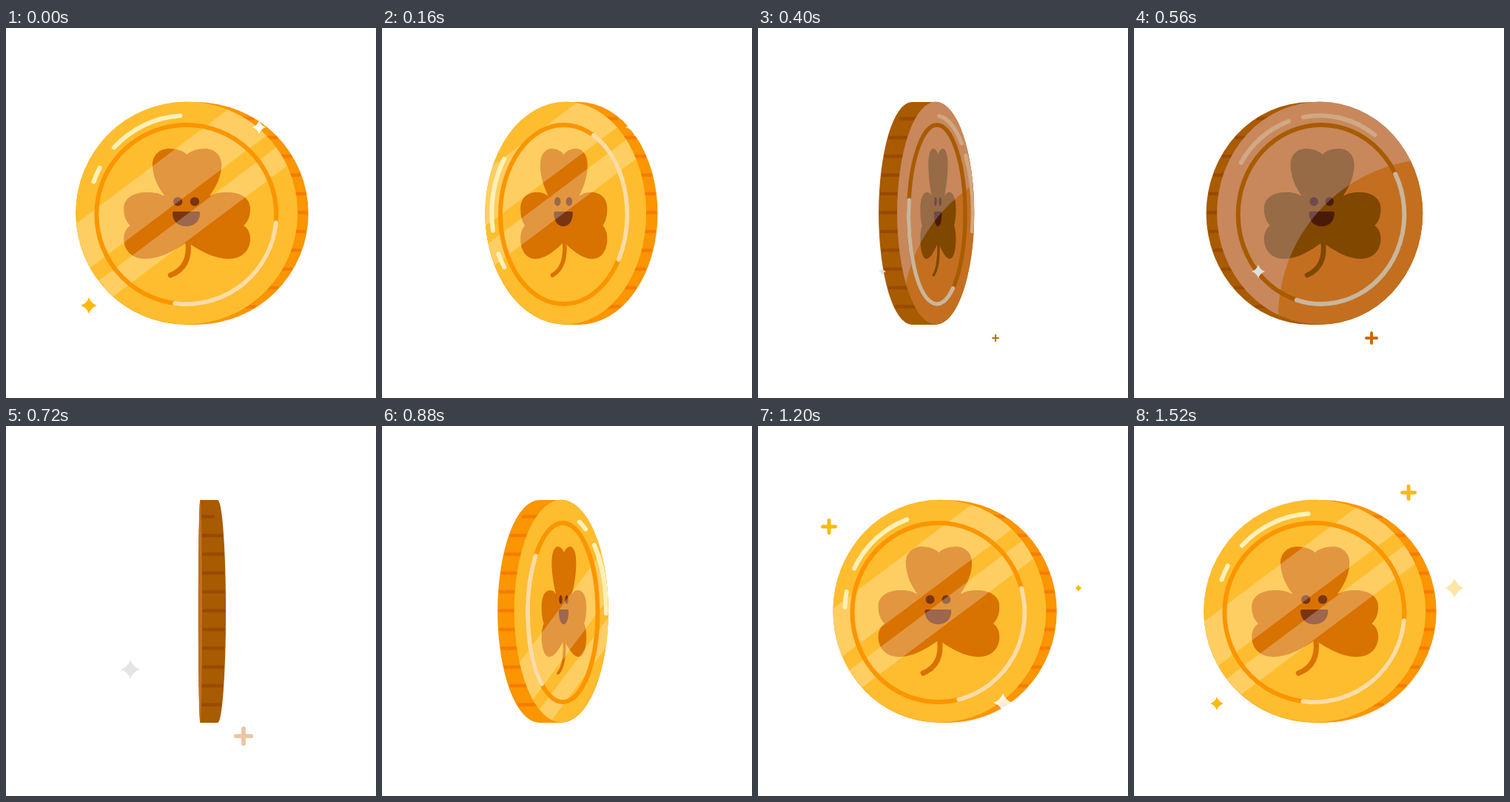
An HTML page with a canvas that plays this animation: 500 px wide and 500 px high, repeating every 1600 ms.

```html
<!DOCTYPE html>
<html lang="en">
<head>
<meta charset="utf-8">
<title>Spinning lucky coin</title>
<style>
  html, body { margin: 0; width: 100%; height: 100%; overflow: hidden; background: #fff; }
  canvas { display: block; width: 100vmin; height: 100vmin; }
</style>
</head>
<body>
<canvas id="stage" width="500" height="500"></canvas>
<script>
const ctx = document.getElementById('stage').getContext('2d');
const LOOP = 1600, STEP = 80, LIFE = 4;
const CY = 250, R = 150.5, RING = 121, RING_Y = 252, RAD = Math.PI / 180;

// key moments of the spin: step, angle in degrees
const SPIN = [[0, 5], [3, 63], [7, 157.5], [9, 269], [13, 321], [15, 377], [18, 365]];

// kind, x, y, step of birth; the loop cuts them off
const SPARKLES = [
  ['star', 112, 375, -3],
  ['white', 342, 134, -2],
  ['plus', 321, 419, 5],
  ['white', 168, 329, 5],
  ['white', 331, 374, 11],
  ['plus', 96, 136, 12],
  ['star', 433, 219, 15],
  ['plus', 371, 90, 16],
  ['star', 112, 375, 17]
];

// each glint: middle angle when face on, half length
const FRONT = {
  face: '#fdbd2e', rim: '#fb9500', tick: '#f57c00', leaf: '#d87200', smile: '#7a3410',
  shine: 'rgba(255,255,255,.25)', ringGlint: '#ffdca6', glint: '#fff0b8',
  spark: '#ffb80c', white: '#fff',
  ringArc: [60, 46], dash: [210, 4.5], arc: [251, 22]
};
const BACK = {
  face: '#c46f1f', rim: '#a85b00', tick: '#9a4a00', leaf: '#7f4700', smile: '#4a1a08',
  shine: 'rgba(211,200,250,.275)', ringGlint: '#c9b69c', glint: '#d0a883',
  spark: '#c86a0a', white: '#e0e0e0',
  ringArc: [1, 67], dash: [200, 19.5], arc: [252.5, 23.5]
};

function spinAt(n) {
  const i = SPIN.findIndex(k => k[0] > n);
  if (i < 0) return SPIN[SPIN.length - 1][1];
  const [n0, a0] = SPIN[i - 1], [n1, a1] = SPIN[i];
  return a0 + (a1 - a0) * (n - n0) / (n1 - n0);
}

// everything about the coin follows from its angle
function poseAt(n) {
  const angle = spinAt(n);
  const back = Math.cos(angle * RAD) < 0;
  const tilt = angle - 180 * Math.round(angle / 180);
  const s = Math.sin(tilt * RAD), side = Math.sign(s);
  const r = R * Math.cos(tilt * RAD);
  const edgeOn = s ** 4;
  const depth = 14.5 + 17.5 * edgeOn ** 2;
  const shift = Math.min(12 + 26 * edgeOn, depth + r - 11);
  const middle = 248.5 + side * (2.5 + 5.5 * Math.abs(s) + 22 * edgeOn ** 2);
  const x = middle - side * depth / 2;
  const lean = Math.sin(2 * tilt * RAD);
  return {
    back, tilt, s, side, r, x,
    rimX: x + side * shift, rimR: r + depth - shift,
    ringX: x - 2.6 * lean, ringR: r * (.81 - .1 * edgeOn),
    leafX: x + 1 - 3.5 * lean, leafR: r * (.57 - .14 * edgeOn)
  };
}

function oval(x, y, rx, ry, from = 0, to = 360) {
  ctx.beginPath();
  ctx.ellipse(x, y, rx, ry, 0, from * RAD, to * RAD);
}

function stroke(color, width) {
  ctx.strokeStyle = color;
  ctx.lineWidth = width;
  ctx.stroke();
}

function drawRim({ x, r, rimX, rimR, side }, c) {
  ctx.save();
  ctx.beginPath();
  ctx.ellipse(rimX, CY + .5, rimR, R, 0, -90 * RAD, 90 * RAD, side < 0);
  ctx.ellipse(x, CY + .5, r, R, 0, 90 * RAD, 270 * RAD, side < 0);
  ctx.closePath();
  ctx.fillStyle = c.rim;
  ctx.fill();
  ctx.clip();
  for (let i = 0; i < 11; i++) {
    const y = 122.5 + i * 25.4;
    const bow = Math.sqrt(1 - ((y - CY) / R) ** 2);
    const inset = i ? 3 : 3 + 9 * (1 - r / R);
    ctx.beginPath();
    ctx.moveTo(x, y);
    ctx.lineTo(rimX + side * (rimR * bow - inset), y);
    stroke(c.tick, 4.5);
  }
  ctx.restore();
}

function drawClover(x, s, c) {
  ctx.save();
  ctx.translate(x, CY);
  ctx.scale(s, 1);
  ctx.fillStyle = c.leaf;
  for (const m of [-1, 1]) {
    const curve = (a, b, d, e, f, g) => ctx.bezierCurveTo(m * a, b, m * d, e, m * f, g);
    ctx.beginPath();
    ctx.moveTo(0, 0);
    curve(25, -10, 45, -40, 45, -65);
    curve(45, -80, 34, -87, 23, -87);
    curve(12, -87, 4, -83, 0, -79);
    ctx.closePath();
    ctx.moveTo(m * 20, -12);
    curve(28, -26, 40, -28, 52, -28);
    curve(70, -28, 82.5, -20, 82.5, -6);
    curve(82.5, 4, 80, 11, 74, 17);
    curve(80, 21, 82.5, 28, 82.5, 35);
    curve(82.5, 50, 72, 62, 54, 62);
    curve(36, 62, 16, 51, 0, 39);
    ctx.lineTo(0, -12);
    ctx.closePath();
    ctx.fill();
  }
  // heart of the clover, closing the seams
  ctx.fillRect(-30, -28, 60, 55);
  ctx.fillRect(-2, -78, 4, 118);
  ctx.beginPath();
  ctx.moveTo(1, 38);
  ctx.bezierCurveTo(4, 60, -2, 76, -21.5, 84);
  ctx.restore();
  stroke(c.leaf, 2 + 5 * s);

  ctx.save();
  ctx.translate(x - s, CY);
  ctx.scale(s, 1);
  ctx.fillStyle = c.smile;
  ctx.beginPath();
  for (const m of [-1, 1]) {
    ctx.moveTo(m * 11 + 6, -15.5);
    ctx.arc(m * 11, -15.5, 6, 0, 2 * Math.PI);
  }
  ctx.moveTo(-16, -2);
  ctx.lineTo(16, -2);
  ctx.quadraticCurveTo(18, -2, 18, 1);
  ctx.bezierCurveTo(17, 13, 9, 18, 0, 18);
  ctx.bezierCurveTo(-9, 18, -17, 13, -18, 1);
  ctx.quadraticCurveTo(-18, -2, -16, -2);
  ctx.fill();
  ctx.restore();
}

function drawShine({ back, s }, c) {
  ctx.fillStyle = c.shine;
  ctx.beginPath();
  if (back) {
    ctx.rect(0, 0, 500, 500);
    ctx.arc(408, 390, 213, 0, 2 * Math.PI);
    ctx.fill('evenodd');
    return;
  }
  // two slanted bands slide up as the face turns away
  const away = Math.min(0, s);
  const slope = -.75 + .65 * away;
  const mid = 240 - 61 * s - 28 * away;
  for (const [top, bottom] of [[-87, -13], [13, 49]]) {
    ctx.moveTo(50, mid + top - 200 * slope);
    ctx.lineTo(450, mid + top + 200 * slope);
    ctx.lineTo(450, mid + bottom + 200 * slope);
    ctx.lineTo(50, mid + bottom - 200 * slope);
    ctx.closePath();
  }
  ctx.fill();
}

function drawCoin(p, c) {
  drawRim(p, c);
  ctx.save();
  oval(p.x, CY, p.r, R);
  ctx.fillStyle = c.face;
  ctx.fill();
  ctx.clip();
  if (p.r > 10) {
    const w = Math.min(6, 1 + p.r / 12);
    const glintR = p.r * (.885 + .12 * (1 - p.r / R));
    const glint = (x, y, rx, ry, [mid, half], rate, color) => {
      const a = mid - rate * p.tilt;
      oval(x, y, rx, ry, a - half, a + half);
      stroke(color, w);
    };
    drawClover(p.leafX, p.leafR / 82.5, c);
    drawShine(p, c);
    oval(p.ringX, RING_Y, p.ringR, RING);
    stroke(c.rim, w);
    glint(p.ringX, RING_Y, p.ringR, RING, c.ringArc, 1.74, c.ringGlint);
    glint(p.x, CY, glintR, R * .875, c.dash, 1.36, c.glint);
    glint(p.x, CY, glintR, R * .875, c.arc, 1.36, c.glint);
  }
  ctx.restore();
}

function drawSparkle([kind, x, y, birth], n, c) {
  const age = n - birth;
  if (age < 0 || age > LIFE) return;
  const size = 5 + 2 * age;
  const white = kind === 'white';
  ctx.save();
  ctx.translate(x, y);
  if (age === LIFE) ctx.globalAlpha = white ? .85 : .38;
  ctx.beginPath();
  if (kind === 'plus') {
    const w = size * .44, a = size - w / 2;
    ctx.moveTo(-a, 0);
    ctx.lineTo(a, 0);
    ctx.moveTo(0, -a);
    ctx.lineTo(0, a);
    stroke(c.spark, w);
  } else {
    const q = size * .25;
    ctx.moveTo(0, -size);
    for (let i = 0; i < 4; i++) {
      const a = i * 90 * RAD, b = a - 45 * RAD;
      ctx.quadraticCurveTo(q * Math.SQRT2 * Math.cos(b), q * Math.SQRT2 * Math.sin(b),
        size * Math.cos(a), size * Math.sin(a));
    }
    ctx.fillStyle = white ? c.white : c.spark;
    ctx.fill();
  }
  ctx.restore();
}

function draw(time) {
  const n = Math.floor(time % LOOP / STEP);
  const pose = poseAt(n);
  const colors = pose.back ? BACK : FRONT;
  ctx.fillStyle = '#fff';
  ctx.fillRect(0, 0, 500, 500);
  ctx.lineCap = ctx.lineJoin = 'round';
  drawCoin(pose, colors);
  for (const s of SPARKLES) drawSparkle(s, n, colors);
}

const start = performance.now();
function tick() {
  draw(performance.now() - start);
  requestAnimationFrame(tick);
}
tick();
</script>
</body>
</html>
```
